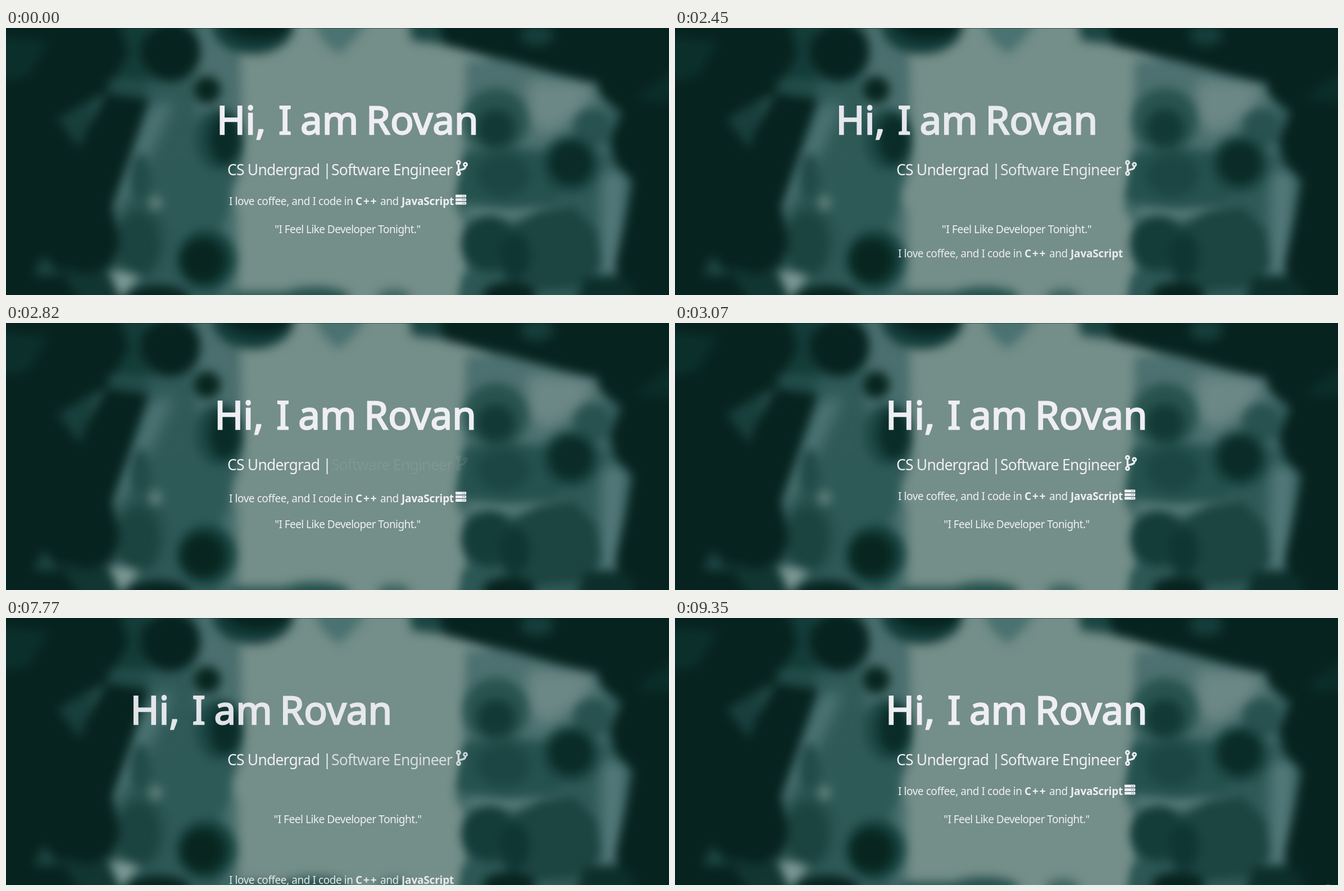
An HTML page that plays this animation: 1180 px wide and 475 px high, repeating every 9.43 s.

```html
<!DOCTYPE html>
<html lang="en">
<head>
<meta charset="utf-8">
<title>Intro banner</title>
<style>
  html, body { margin: 0; width: 100%; height: 100%; overflow: hidden; background: #2f5a58; }
  svg { position: absolute; left: 0; top: 0; width: 1180px; height: 475px; overflow: hidden; }
  #back { will-change: transform; }
  .soft { filter: blur(13px); }
  .mid { filter: blur(9px); }
  .dark { fill: #07231f; }
  text { font-family: "Noto Sans", "Open Sans", sans-serif; fill: #f0f0f4; white-space: pre; }
  #title text { font-size: 69px; fill: #eeeef3; stroke: #eeeef3; stroke-width: 2.4px; }
  .tag { font-size: 26.5px; letter-spacing: -.03em; }
  .line { font-size: 19px; letter-spacing: -.023em; }
  .bold { font-weight: 700; letter-spacing: -.01em; }
  #quote text { letter-spacing: -.03em; text-anchor: middle; }
</style>
</head>
<body>
<svg id="back" viewBox="0 0 1180 475">
  <rect width="1180" height="475" fill="#2f5a58"/>
  <!-- broad tones -->
  <g class="soft">
    <path fill="#4a6f6e" d="M335-30H440V160H340Z"/>
    <path fill="#4c7170" d="M810 40H1070V220H810Z"/>
    <path fill="#6b8786" d="M930 92L1045 95L1030 150L960 190L925 160Z"/>
    <path fill="#4d7474" d="M255 140L300 130L250 240L190 345L185 310Z"/>
    <path fill="#54797a" d="M1060 255L1105 255L1095 400L1080 500H1055Z"/>
    <path fill="#5c7f7c" d="M815 316L950 318L1000 330L900 345H815Z"/>
    <path fill="#4b716f" d="M385 290H430V500H385Z"/>
    <path fill="#143d39" d="M190-30H260V100H190Z"/>
    <path fill="#123733" d="M80 420H190L230 510H80Z"/>
    <ellipse fill="#254f4c" cx="240" cy="375" rx="45" ry="70"/>
  </g>
  <g class="mid">
    <path fill="#748e89" d="M416-30H820V80L816 240L802 320L820 350V430L805 510H412V330L400 300L420 240Z"/>
    <path fill="#748e89" d="M700 10L830 35L870 58L820 58H700Z"/>
  </g>
  <!-- left side -->
  <g class="mid">
    <path class="dark" d="M-30-30H198L218 45L188 105L150 140L130 205L180 115L254 126L222 220L188 318L205 385L185 425L150 440L95 430L150 510H-30Z"/>
    <path fill="#0b302c" d="M-10 15L75 25L40 85L-10 95Z"/>
    <path fill="#183f3c" d="M92 162L165 118L132 215Z"/>
    <path fill="#1d4643" d="M50 440L66 405L98 440Z"/>
    <path fill="#7c9894" d="M182 430L242 438L205 482Z"/>
    <path fill="#1f4a47" d="M180 90L240 100L255 122L185 110Z"/>
    <circle class="dark" cx="292" cy="42" r="53"/>
    <ellipse fill="#123b38" cx="440" cy="-4" rx="72" ry="50"/>
    <ellipse class="dark" cx="450" cy="-12" rx="60" ry="32"/>
    <circle fill="#07261f" cx="358" cy="110" r="24"/>
    <ellipse fill="#1c4744" cx="379" cy="199" rx="41" ry="55"/>
    <ellipse fill="#0a2c28" cx="390" cy="198" rx="28" ry="44"/>
    <ellipse fill="#2d5a57" cx="340" cy="305" rx="58" ry="58"/>
    <ellipse fill="#214b48" cx="240" cy="265" rx="18" ry="42"/>
    <ellipse fill="#66847f" cx="266" cy="311" rx="11" ry="13"/>
    <ellipse fill="#1b4340" cx="235" cy="385" rx="36" ry="55"/>
    <circle fill="#15403c" cx="356" cy="412" r="53"/>
    <circle fill="#08261f" cx="350" cy="414" r="39"/>
    <ellipse class="dark" cx="270" cy="482" rx="58" ry="24"/>
  </g>
  <!-- top and bottom of the panel -->
  <g class="mid">
    <path fill="#4a7270" d="M545-20H645L625 15L592 47L562 20Z"/>
    <ellipse fill="#24504d" cx="550" cy="480" rx="62" ry="19"/>
    <ellipse fill="#3b6360" cx="690" cy="480" rx="30" ry="15"/>
    <path fill="#24504d" d="M400 470H520V500H400Z"/>
  </g>
  <!-- right side -->
  <g class="mid">
    <path fill="#1b4542" d="M715-30H800L790 30L722 22Z"/>
    <path class="dark" d="M765-30H1210V90L1040 96L985 83L880 54L780 30Z"/>
    <ellipse fill="#153d39" cx="945" cy="12" rx="30" ry="20"/>
    <circle fill="#28534f" cx="872" cy="165" r="58"/>
    <circle fill="#123935" cx="872" cy="178" r="34"/>
    <path fill="#25514e" d="M816 225L900 215L985 230L985 310L890 318L803 305Z"/>
    <ellipse fill="#1b4643" cx="885" cy="262" rx="48" ry="38"/>
    <circle fill="#285250" cx="1045" cy="178" r="36"/>
    <circle fill="#1a4441" cx="1005" cy="242" r="51"/>
    <circle fill="#0a2b27" cx="1005" cy="240" r="38"/>
    <path class="dark" d="M1042-30H1210V510H1100L1086 420L1104 340L1116 272L1085 240L1076 200L1096 150L1060 122L1042 70Z"/>
    <path fill="#0b2e2a" d="M1150 130H1210V60L1120 125Z"/>
    <circle fill="#143c39" cx="860" cy="384" r="49"/>
    <path fill="#1c4441" d="M890 360L950 325L1010 318L1050 360L1058 420L1030 460L910 470L870 420Z"/>
    <ellipse fill="#0f3632" cx="905" cy="405" rx="28" ry="42"/>
    <path fill="#2c5754" d="M815 440L880 430L860 500H805Z"/>
    <ellipse class="dark" cx="895" cy="476" rx="47" ry="24"/>
    <path fill="#0c2f2b" d="M1030 445L1075 438L1115 455L1120 500H1010Z"/>
  </g>
  <rect width="1180" height="1" fill="#04201c" opacity=".45"/>
</svg>

<svg viewBox="0 0 1180 475">
  <defs>
    <clipPath id="slot"><rect x="798" y="294" width="24" height="26"/></clipPath>
  </defs>
  <g id="title">
    <text x="375" y="189">Hi,</text>
    <text x="485" y="189">I</text>
    <text x="524" y="189">am</text>
    <text x="641" y="189">Rovan</text>
  </g>
  <text class="tag" x="394" y="262">CS Undergrad |</text>
  <g id="role">
    <text class="tag" x="579" y="262">Software Engineer</text>
    <g fill="none" stroke="#f0f0f4" stroke-width="3">
      <circle cx="805.4" cy="239.4" r="2.9"/>
      <circle cx="805.4" cy="258.6" r="2.9"/>
      <circle cx="817.6" cy="242.9" r="2.9"/>
      <path stroke-width="3.4" d="M805.4 243V255M817.6 246.5C817.6 254 806 250 805.4 255"/>
    </g>
  </g>
  <g id="love">
    <text class="line" x="397" y="315">I love coffee, and I code in</text>
    <text class="line bold" x="622" y="315" style="letter-spacing:.1em">C++</text>
    <text class="line" x="666" y="315">and</text>
    <text class="line bold" x="704" y="315">JavaScript</text>
    <g clip-path="url(#slot)"><g id="server"></g></g>
  </g>
  <g id="quote"><text class="line" x="608" y="365">"I Feel Like Developer Tonight."</text></g>
  <circle id="spot" r="12" fill="#d8c21c" opacity=".65"/>
</svg>

<script>
const LOOP = 9430;
const el = id => document.getElementById(id);
const [title, role, love, server, quote, spot] =
  ["title", "role", "love", "server", "quote", "spot"].map(el);

server.innerHTML = [296.6, 302.9, 309.2].map(y =>
  `<rect x="800" y="${y}" width="19.2" height="5" rx="1.1" fill="#f0f0f4"/>` +
  [813, 816.2].map(x => `<circle cx="${x}" cy="${y + 2.5}" r=".9" fill="#64807c"/>`).join("")
).join("");

function bezier(x1, y1, x2, y2) {
  const at = (a, b, s) => 3 * (1 - s) * (1 - s) * s * a + 3 * (1 - s) * s * s * b + s * s * s;
  return x => {
    let lo = 0, hi = 1;
    for (let i = 0; i < 24; i++) {
      const m = (lo + hi) / 2;
      if (at(x1, x2, m) < x) lo = m; else hi = m;
    }
    return at(y1, y2, (lo + hi) / 2);
  };
}
const linear = x => x;
const ease = bezier(.25, .1, .25, 1);
const outCubic = bezier(.215, .61, .355, 1);

// steps: [time, value] pairs, each segment eased on its own
function track(steps, curve, t) {
  if (t <= steps[0][0]) return steps[0][1];
  for (let i = 1; i < steps.length; i++) {
    const [a, from] = steps[i - 1], [b, to] = steps[i];
    if (t < b) return from + (to - from) * curve((t - a) / (b - a));
  }
  return steps[steps.length - 1][1];
}

const FROM_LEFT = [[0, -3000], [.6, 25], [.75, -10], [.9, 5], [1, 0]];
const FROM_BELOW = [[0, 3000], [.6, -20], [.75, 10], [.9, -5], [1, 0]];
const FADE = [[0, 0], [.6, 1]];
const FLASH = [[0, 1], [.25, 0], [.5, 1], [.75, 0], [1, 1]];
const POP = [[0, .3], [.2, 1.1], [.4, .9], [.6, 1.03], [.8, .97], [1, 1]];
const SLOT = [[.55, 25], [.75, 0]];

// clock of each entrance: [loop ms, progress]
const RUNS = [
  [[2040, 0], [2640, .609], [3070, 1]],
  [[7280, 0], [7770, .377], [8350, 1]]
];

function draw(ms) {
  const run = RUNS.find(r => ms >= r[0][0] && ms < r[2][0]);
  const p = run ? track(run, linear, ms) : 1;
  const q = Math.min(1, p / .75);
  const fade = track(FADE, outCubic, p);

  title.setAttribute("transform", `translate(${track(FROM_LEFT, outCubic, p)} 0)`);
  title.setAttribute("opacity", fade);
  love.setAttribute("transform", `translate(0 ${track(FROM_BELOW, outCubic, p)})`);
  love.setAttribute("opacity", fade);
  server.setAttribute("transform", `translate(0 ${track(SLOT, linear, p)})`);
  role.setAttribute("opacity", track(FLASH, ease, p));
  quote.setAttribute("transform",
    `translate(608 358) scale(${track(POP, outCubic, q)}) translate(-608 -358)`);
  quote.setAttribute("opacity", track(FADE, outCubic, q));

  // pointer highlight brushing the corner
  const corner = ms >= 8800 && ms < 8900, edge = ms >= 9350;
  spot.setAttribute("visibility", corner || edge ? "visible" : "hidden");
  spot.setAttribute("cx", edge ? 1162 : 1182);
  spot.setAttribute("cy", edge ? 486.2 : 464);
}

const start = performance.now();
function tick() {
  draw((performance.now() - start) % LOOP);
  requestAnimationFrame(tick);
}
tick();
</script>
</body>
</html>
```
